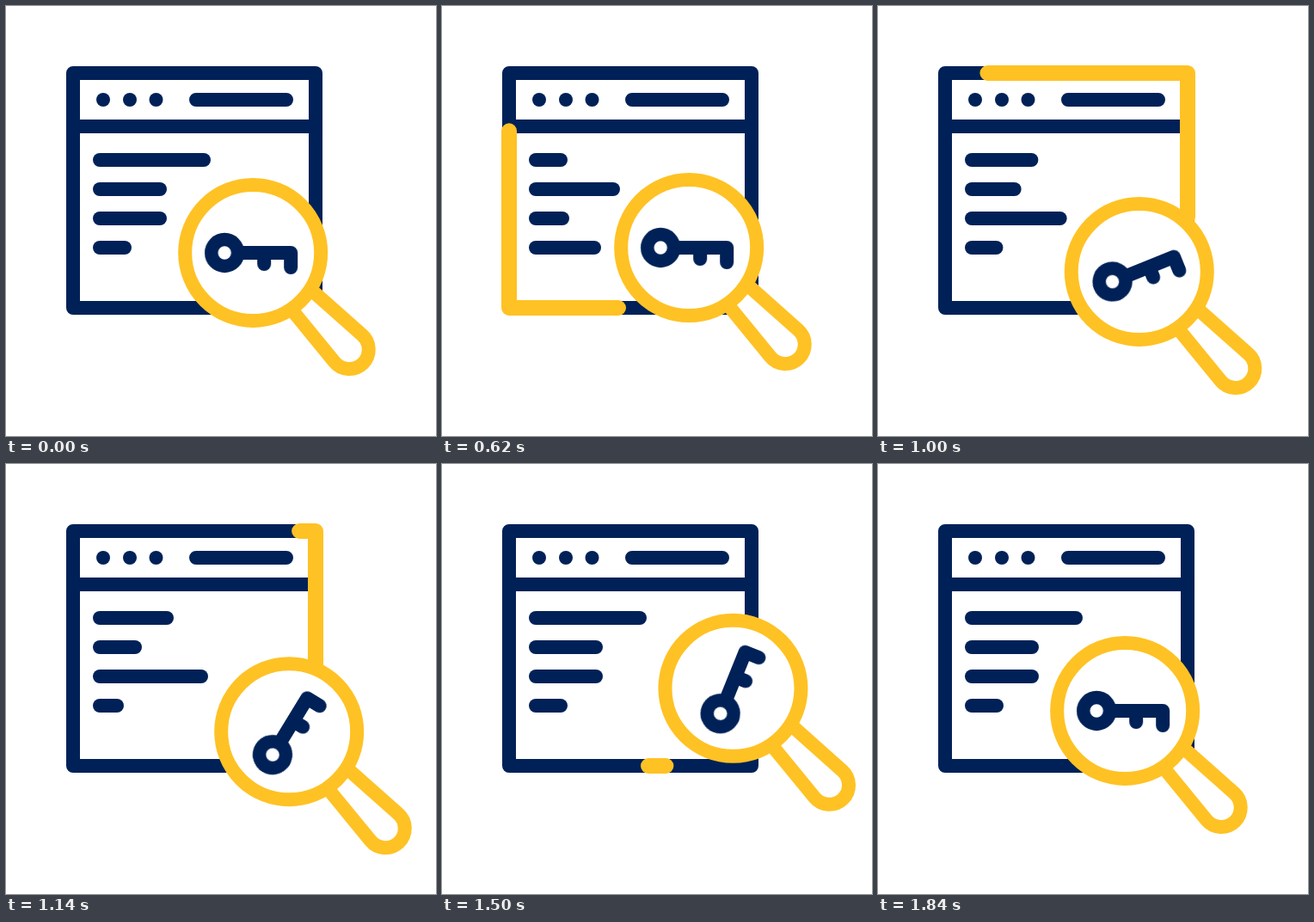
An HTML page without scripts that plays this animation: 500x500 px, repeating every 2 s.

```html
<!DOCTYPE html>
<html lang="en">
<head>
<meta charset="utf-8">
<title>Keyword search</title>
<style>
@property --head { syntax: '<number>'; inherits: false; initial-value: 0; }
@property --tail { syntax: '<number>'; inherits: false; initial-value: 0; }
@property --turn { syntax: '<angle>'; inherits: false; initial-value: 174deg; }

:root {
  --navy: #002157;
  --gold: #ffc224;
  --ease: cubic-bezier(.333, 0, .667, 1);
}
html, body { margin: 0; width: 100%; height: 100%; overflow: hidden; background: #fff; }
svg { display: block; width: 100%; height: 100%; }

.stroke { fill: none; stroke: var(--navy); stroke-width: 16; stroke-linecap: round; stroke-linejoin: round; }
.solid { fill: var(--navy); }
.gold { stroke: var(--gold); }
.glass { fill: #fff; }

/* Text rows change length */
.row { width: var(--a); animation: row 2s var(--ease) infinite; }
@keyframes row {
  0%, 8.5% { width: var(--a); }
  31% { width: var(--b); }
  57% { width: var(--c); }
  74%, 100% { width: var(--a); }
}

/* Gold trace runs round the window border */
.trace {
  stroke-width: 18;
  stroke-dasharray: calc((var(--head) - var(--tail)) * 1px) 2000px;
  stroke-dashoffset: calc(var(--tail) * -1px);
  animation: head 2s var(--ease) infinite, tail 2s var(--ease) infinite, show 2s step-end infinite;
}
@keyframes head {
  0%, 8.5% { --head: 0; }
  67%, 100% { --head: 1110; }
}
@keyframes tail {
  0%, 25.3% { --tail: 0; }
  79.4%, 100% { --tail: 1110; }
}
@keyframes show {
  0% { visibility: hidden; }
  8.6% { visibility: visible; }
  79.3%, 100% { visibility: hidden; }
}

/* Magnifier circles on an ellipse */
.lens {
  transform: translate(calc(32.5px + 32.5px * cos(var(--turn))), calc(-3px + 28.5px * sin(var(--turn))));
  animation: orbit 2s linear infinite;
}
@keyframes orbit {
  0% { --turn: 174deg; }
  8.5% { --turn: 174deg; animation-timing-function: var(--ease); }
  31% { --turn: 186deg; animation-timing-function: cubic-bezier(.5, 0, .75, .3); }
  44% { --turn: 159deg; }
  57% { --turn: 73deg; }
  62% { --turn: 40deg; }
  68% { --turn: -4deg; }
  82% { --turn: -104deg; }
  92%, 100% { --turn: -186deg; }
}

.key { transform-origin: 284.9px 288.1px; animation: swing 2s var(--ease) infinite; }
@keyframes swing {
  0%, 42% { transform: rotate(0deg); }
  67% { transform: rotate(-90deg); }
  92%, 100% { transform: rotate(0deg); }
}
</style>
</head>
<body>
<svg viewBox="0 0 500 500">
  <g class="stroke">
    <rect x="78" y="78" width="282" height="273"/>
    <path d="M78 140H360M221 109H326"/>
  </g>
  <g class="solid">
    <circle cx="113" cy="109" r="8"/>
    <circle cx="144" cy="109" r="8"/>
    <circle cx="174.5" cy="109" r="8"/>
    <rect class="row" x="101" y="171" height="16" rx="8" style="--a:137px;--b:45px;--c:94px"/>
    <rect class="row" x="101" y="205" height="16" rx="8" style="--a:86px;--b:106px;--c:57px"/>
    <rect class="row" x="101" y="239" height="16" rx="8" style="--a:86px;--b:47px;--c:134px"/>
    <rect class="row" x="101" y="273" height="16" rx="8" style="--a:45px;--b:84px;--c:36px"/>
  </g>
  <path class="stroke gold trace" d="M240 351H78V78H360V351H240"/>
  <g class="lens">
    <g class="stroke gold">
      <path class="glass" d="M357 332L413.9 382.6A22.5 22.5 0 1 1 381.6 413.7L336 358"/>
      <circle class="glass" cx="287" cy="287" r="79"/>
    </g>
    <g class="stroke key">
      <circle cx="254" cy="287" r="15.4" stroke-width="15.5"/>
      <path d="M272 287H331V304M300 287V300"/>
    </g>
  </g>
</svg>
</body>
</html>
```
